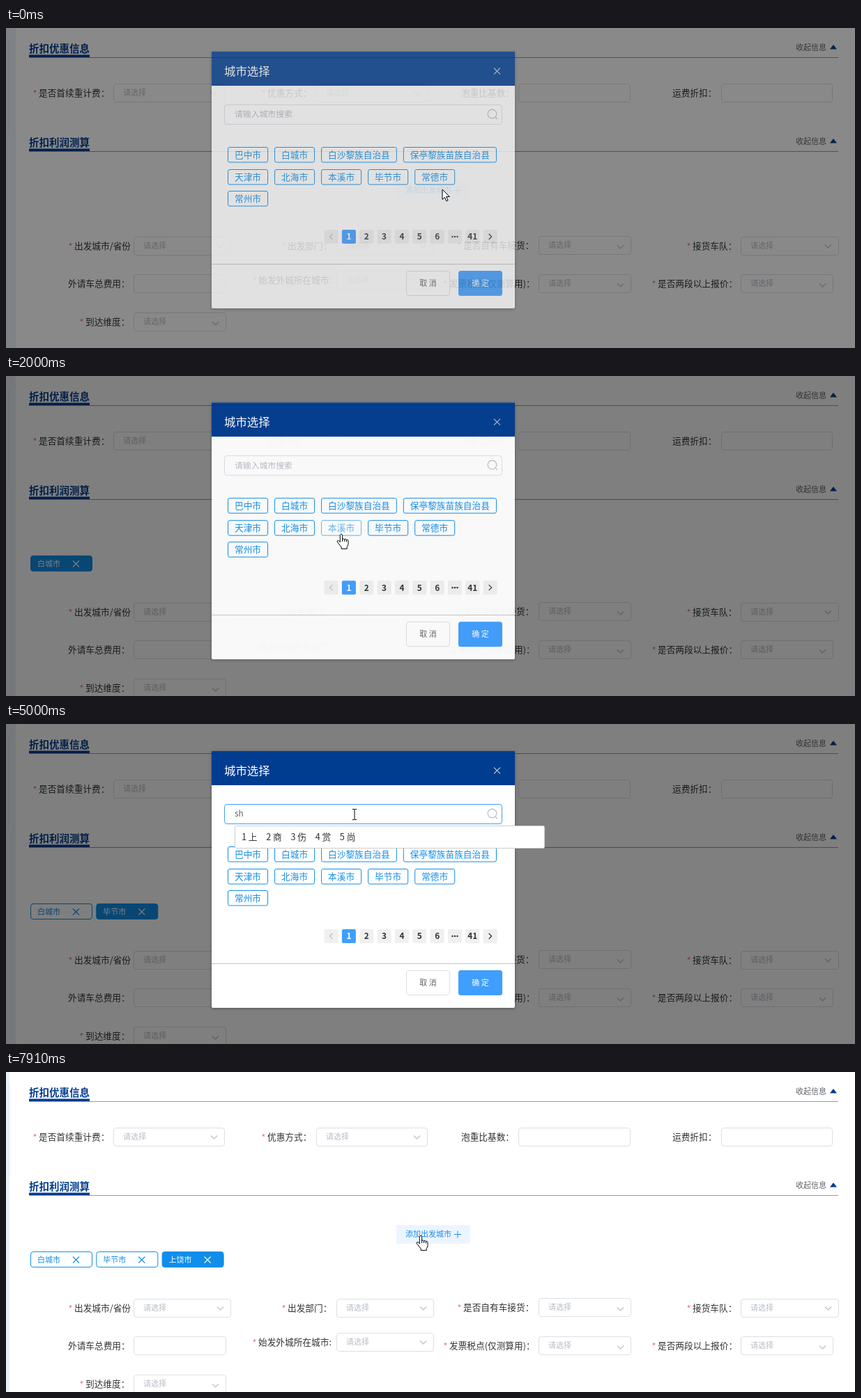
An HTML page for the animation above (8 s loop, 1218 by 460 pixels).

```html
<!DOCTYPE html>
<html lang="zh-CN">
<head>
<meta charset="utf-8">
<title>城市选择</title>
<style>
html, body { margin: 0; width: 100%; height: 100%; overflow: hidden; background: #fff; }
svg { display: block; font-family: "Noto Sans CJK SC", "Noto Sans CJK", "Liberation Sans", sans-serif; }
</style>
</head>
<body>
<svg id="stage" width="1218" height="460" viewBox="0 0 1218 460"></svg>
<script>
const LOOP = 8000;
const NAVY = '#003c8f', BLUE = '#108ee9', PRIMARY = '#409eff', BORDER = '#dcdfe6', HINT = '#b9bdc5', INK = '#303133';
const LABEL = 12.68, SMALL = 11, MEDIUM = 11.85;

// Bursts of screen updates: first time, last time, number of updates.
const BURSTS = [[0, 0, 1], [120, 1080, 8], [1230, 2130, 7], [2280, 3190, 8], [3340, 4170, 7], [4450, 4450, 1],
  [4850, 5280, 4], [5740, 5740, 1], [6150, 6150, 1], [6430, 7360, 8], [7490, 7910, 4]];
const UPDATES = BURSTS.flatMap(([from, to, n]) =>
  Array.from({ length: n }, (_, i) => n > 1 ? from + (to - from) * i / (n - 1) : from));

// Dialog visits: opened, confirmed, chosen city.
const VISITS = [[-136, 1180, '白城市'], [1755, 2870, '毕节市'], [3250, 7340, '上饶市']];
const FOCUS = 4040, TYPING = 4850, COMMIT = 5740;

// Pointer path: time, x, y.
const PATH = [[0, 626, 232], [530, 414, 190], [670, 414, 190], [1080, 680, 370], [1230, 680, 370], [1530, 618, 240],
  [1670, 613, 236], [1750, 613, 236], [1975, 481, 227], [2000, 481, 227], [2280, 548, 220], [2410, 548, 220],
  [2790, 680, 372], [2870, 680, 372], [3185, 618, 233], [3250, 618, 233], [3470, 493, 174], [3500, 493, 174],
  [3900, 500, 130], [6150, 500, 130], [6430, 510, 154], [6700, 414, 189], [6830, 414, 189], [7220, 680, 311],
  [7360, 680, 311], [7630, 632, 246], [7910, 595, 235], [8000, 595, 235]];

const CITIES = ['巴中市', '白城市', '白沙黎族自治县', '保亭黎族苗族自治县', '天津市', '北海市', '本溪市', '毕节市', '常德市', '常州市'];
const FOUND = ['上海市', '上饶市'];

const ease = x => 1 - (1 - Math.min(1, Math.max(0, x))) ** 2.3;

const text = (x, y, str, size, fill, extra = '') =>
  `<text x="${x}" y="${y + size * .37}" font-size="${size}" fill="${fill}" ${extra}>${str}</text>`;
const rect = (x, y, w, h, fill, r = 0) =>
  `<rect x="${x}" y="${y}" width="${w}" height="${h}" rx="${r}" fill="${fill}"/>`;
const box = (x, y, w, h, stroke, fill = 'none', r = 3.5) =>
  `<rect x="${x + .5}" y="${y + .5}" width="${w - 1}" height="${h - 1}" rx="${r}" fill="${fill}" stroke="${stroke}"/>`;
const line = (d, stroke, width = 1) => `<path d="${d}" fill="none" stroke="${stroke}" stroke-width="${width}"/>`;
const cross = (x, y, r, stroke) => line(`M${x - r} ${y - r}l${2 * r} ${2 * r}m0 ${-2 * r}l${-2 * r} ${2 * r}`, stroke, 1.1);

function section(y, title) {
  return text(33, y, title, 14.5, NAVY, 'font-weight="700"') + rect(33, y + 12, 1161, 1, '#999') +
    rect(33, y + 8.5, 87, 3.5, NAVY) + text(1133, y - 2, '收起信息', SMALL, '#606266') +
    `<path d="M1182 ${y + .5}l5-6.5 5 6.5z" fill="${NAVY}"/>`;
}

function field(labelX, label, x, y, w, { star = true, select = true, textY = 13, chevronX = 15.5, chevronY = 14 } = {}) {
  return (star ? text(labelX - 8.5, y + textY + 1, '*', LABEL, '#f56c6c') : '') +
    text(labelX, y + textY, label, LABEL, INK) + box(x, y, w, 27, BORDER, '#fff') +
    (select ? text(x + 14, y + 13, '请选择', SMALL, HINT) +
      line(`M${x + w - chevronX - 4.5} ${y + chevronY - 2.5}l4.5 4.5 4.5-4.5`, HINT, 1.1) : '');
}

function page(tags) {
  const plain = { star: false, select: false };
  const low = { chevronY: 16 };
  let out = rect(0, 0, 1218, 460, '#fff') + rect(0, 0, 5, 460, '#ebf0f8') + rect(4, 18, 1, 133, '#dce2ec') +
    section(30, '折扣优惠信息') + section(165, '折扣利润测算') +
    field(47, '是否首续重计费：', 154, 80, 160) + field(375, '优惠方式：', 445, 80, 160) +
    field(653, '泡重比基数：', 735, 80, 161, plain) + field(956, '运费折扣：', 1026, 80, 160, plain) +
    rect(560, 220, 106, 27, '#ecf5ff', 2) + text(573, 233, '添加出发城市', SMALL, '#1f8ceb') +
    line('M643 233.5h10m-5-5v10', '#1f8ceb');
  tags.forEach((city, i) => {
    const x = 35 + i * 94.3, active = i === tags.length - 1, ink = active ? '#fff' : BLUE;
    out += box(x, 258, 89, 23, BLUE, active ? BLUE : '#fff') + text(x + 10, 269.5, city, SMALL, ink) + cross(x + 65.5, 270, 4.5, ink);
  });
  return out + `<g transform="translate(0 ${tags.length ? 0 : -26})">` +
    field(98, '出发城市/省份', 183, 326, 140) + field(404, '出发部门：', 474, 326, 140) +
    field(656, '是否自有车接货：', 764, 325, 133, low) + field(985, '接货车队：', 1054, 326, 141) +
    field(89, '外请车总费用：', 183, 380, 133, plain) + field(362, '始发外城所在城市:', 474, 375, 140) +
    field(636, '发票税点(仅测算用)：', 764, 380, 133, low) + field(935, '是否两段以上报价：', 1054, 380, 133, low) +
    field(114, '到达维度：', 183, 435, 133, low) + '</g>';
}

function cityTags(cities) {
  let x = 318, y = 176;
  return cities.map(name => {
    const w = name.length * LABEL + 20;
    if (x + w > 708) { x = 318; y += 31.7; }
    const tag = { name, x, y: Math.round(y), w };
    x += w + 9;
    return tag;
  });
}

const inside = (p, x, y, w, h, margin = 0) =>
  p.x >= x && p.x <= x + w && p.y >= y - margin && p.y <= y + h;

function pager(labels, y) {
  return labels.map((label, i) => {
    const x = 684.7 - 25.35 * (labels.length - 1 - i), mid = x + 10, active = label === '1';
    const arrow = label === '<' ? -1 : label === '>' ? 1 : 0;
    const muted = arrow < 0 || labels.length === 3;
    return rect(x, y, 20, 20, active ? PRIMARY : '#f0f0f1', 2) +
      (arrow ? line(`M${mid - 2 * arrow} ${y + 6}l${4 * arrow} 4 ${-4 * arrow} 4`, muted ? HINT : INK, 1.2)
        : label === '…' ? [-3.5, 0, 3.5].map(d => `<circle cx="${mid + d}" cy="${y + 10}" r="1.2" fill="${INK}"/>`).join('')
        : text(mid, y + 10, label, MEDIUM, active ? '#fff' : INK, 'font-weight="700" text-anchor="middle"'));
  }).join('');
}

function dialog(t, pointer) {
  const searched = t >= COMMIT;
  const focused = t >= FOCUS;
  const foot = searched ? 281 : 344;
  const composing = t >= TYPING && t < COMMIT;
  const typed = composing ? ['s', 'sh', 'shan', 'shang'][Math.min(3, Math.floor((t - TYPING + 5) / 143))] : searched ? '上' : '';
  let out = `<rect x="295" y="39" width="435" height="${foot + 25}" rx="2" fill="#fff" style="filter:drop-shadow(0 1px 2px #0005)"/>` +
    rect(295, 39, 435, 49, NAVY) + text(313, 67, '城市选择', 16.4, '#fff') + cross(704.5, 67, 4.5, '#b4bccb') +
    box(313, 115, 399, 29, focused ? PRIMARY : BORDER, '#fff') +
    (typed ? text(328, 129, typed, MEDIUM, '#606266') : text(328, 129, '请输入城市搜索', MEDIUM, HINT)) +
    `<circle cx="697.5" cy="128.5" r="6.3" fill="none" stroke="${HINT}" stroke-width="1.2"/>` + line('M702 133l3 3', HINT, 1.2);
  if (focused && t < 4450) out += rect(328, 123, 1, 14, INK);
  if (searched && t < 6150) out += rect(340, 122, 1, 14, INK);
  for (const { name, x, y, w } of cityTags(searched ? FOUND : CITIES)) {
    const hover = inside(pointer, x, y, w, 22, 3);
    out += `<g opacity="${hover ? .65 : 1}">${box(x, y, w, 22.5, BLUE, '#fff', 2.5)}${text(x + 10, y + 11, name, LABEL, BLUE)}</g>`;
  }
  const sure = inside(pointer, 649, foot + 10, 63, 36);
  out += pager(searched ? ['<', '1', '>'] : ['<', '1', '2', '3', '4', '5', '6', '…', '41', '>'], foot - 49) +
    rect(295, foot, 435, 1, '#c4c4c4') + box(574, foot + 10, 63, 36, BORDER, '#fff') +
    rect(649, foot + 10, 63, 36, sure ? '#66b1ff' : PRIMARY, 3.5) +
    text(605.5, foot + 28, '取 消', SMALL, '#606266', 'text-anchor="middle"') +
    text(680.5, foot + 28, '确 定', SMALL, '#fff', 'text-anchor="middle" font-weight="500"');
  if (composing) {
    out += box(328, 146, typed.length < 2 ? 494 : 445, 33, '#ccc', '#fff', 2) +
      text(338, 162, '1 上　2 商　3 伤　4 赏　5 尚', LABEL, INK);
  }
  return out;
}

function pointerAt(t) {
  const i = Math.max(1, PATH.findIndex(k => k[0] >= t));
  const [t0, x0, y0] = PATH[i - 1], [t1, x1, y1] = PATH[i];
  const u = (t - t0) / (t1 - t0), s = u * u * (3 - 2 * u);
  return { x: x0 + (x1 - x0) * s, y: y0 + (y1 - y0) * s };
}

function pointerShape(p, kind) {
  const shapes = {
    arrow: '<path d="M0 0v14.5l3.4-3.1 2.4 5.4 2.3-1-2.4-5.3h4.6z" fill="#fff" stroke="#000"/>',
    hand: '<path d="M-1.7 1.5q1.7-2.8 3.3 0v6q1.6-1.5 3 .4 1.6-1.2 2.8.5 2.2-.8 2.6 1.5v4.5q-.3 3-1.8 4.2v2.8h-8v-2.4l-5.8-7.3q-.9-2.3 1.4-2.3l2.5 2.4z" fill="#fff" stroke="#000"/><path d="M1.6 7v4m3-3v3m2.8-2.5v3" stroke="#000" fill="none"/>',
    beam: '<path d="M-3-7.5h2.5l.5.5.5-.5H3M0-7V7M-3 7.5h2.5L0 7l.5.5H3" stroke="#000" fill="none"/>'
  };
  return `<g transform="translate(${p.x} ${p.y})">${shapes[kind]}</g>`;
}

function scene(t) {
  const [opened, closed] = VISITS.filter(v => v[0] <= t).pop();
  const open = t < closed;
  const shown = ms => open ? ease((t - opened) / ms) : 1 - ease((t - closed) / ms);
  const veil = shown(200), fade = shown(300), rise = -20 * (1 - fade);
  const tags = VISITS.filter(v => v[1] <= t).map(v => v[2]);
  const pointer = pointerAt(t);
  const local = { x: pointer.x, y: pointer.y - rise };
  const searched = t >= COMMIT, foot = searched ? 281 : 344;

  const onLink = open
    ? inside(local, 649, foot + 10, 63, 36) ||
      cityTags(searched ? FOUND : CITIES).some(c => inside(local, c.x, c.y, c.w, 22))
    : inside(pointer, 560, 220, 106, 27);
  const kind = onLink ? 'hand' : open && inside(local, 313, 115, 375, 29) ? 'beam' : 'arrow';

  return page(tags) +
    (veil > 0 ? `<g opacity="${veil}">${rect(5, 0, 9, 460, '#ebf0f8')}</g><g opacity="${veil / 2}">${rect(0, 0, 1218, 460, '#000')}</g>` : '') +
    (fade > 0 ? `<g opacity="${fade}" transform="translate(0 ${rise})">${dialog(t, local)}</g>` : '') +
    pointerShape(pointer, kind);
}

const stage = document.getElementById('stage');
let drawn = -1;
function tick() {
  const now = performance.now() % LOOP;
  const t = UPDATES.filter(u => u <= now).pop();
  if (t !== drawn) {
    stage.innerHTML = scene(t);
    drawn = t;
  }
  requestAnimationFrame(tick);
}
tick();
</script>
</body>
</html>
```
